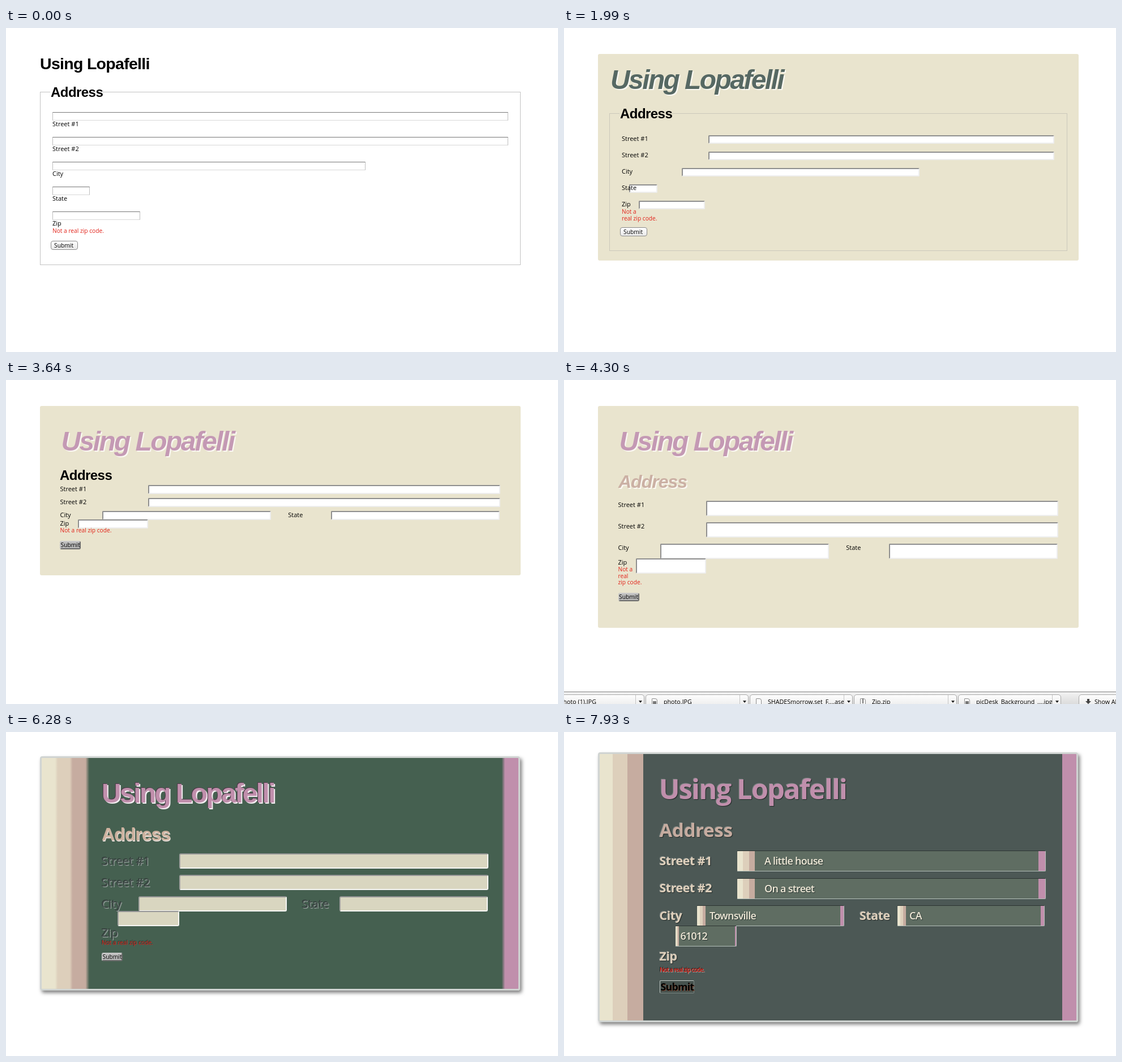
Animation of 975x574 px, one loop 8 s. Source, as an HTML page:

```html
<!DOCTYPE html>
<html lang="en">
<head>
<meta charset="utf-8">
<title>Styling a form</title>
<style>
  html, body { margin: 0; width: 100%; height: 100%; overflow: hidden; background: #fff; }
  .scene { position: absolute; inset: 0; overflow: hidden; display: none; }
  .scene div { position: absolute; box-sizing: border-box; }
  .text { line-height: 0; white-space: pre; color: #000; }
</style>
</head>
<body>
<script>
const LOOP = 8000;
const NAME = 'Using Lopafelli';
const cream = '#e9e4ce', tan = '#ddcfbb', rose = '#c6aca0', pink = '#c08fac', dark = '#4c5855', green = '#456050';

// family, ascent, descent
const FONT = {
  head: ['"Liberation Sans", Arial, sans-serif', .905, .212],
  body: ['"Open Sans", "Noto Sans", sans-serif', 1.069, .293]
};

// ---- drawing helpers ----
function box(parent, [x, y, w, h], css) {
  const el = document.createElement('div');
  el.style.cssText = `left:${x}px;top:${y}px;width:${w}px;height:${h}px;${css}`;
  parent.append(el);
  return el;
}

// y is the baseline
function text(parent, str, x, y, size, css = '', font = 'body') {
  const [family, up, down] = FONT[font];
  const shift = (Math.round(up * size) - Math.round(down * size)) / 2;
  const el = document.createElement('div');
  el.className = 'text';
  el.style.cssText = `left:${x}px;top:${y - shift}px;font:${size}px/0 ${family};${css}`;
  el.textContent = str;
  parent.append(el);
}

const bands = (mid, a, b, c, d) =>
  `linear-gradient(90deg,${cream} ${a}%,${tan} ${a}% ${b}%,${rose} ${b}% ${c}%,${mid} ${c}% ${d}%,${pink} ${d}%)`;

// ---- form layouts: fields as boxes, labels as [text, x, baseline] ----
const NAMES = ['Street #1', 'Street #2', 'City', 'State', 'Zip'];

function stacked(dy) {
  const row = i => 149 + 44 * i + dy;
  return {
    fields: [805, 805, 553, 66, 155].map((w, i) => [82, row(i), w, 15]),
    labels: NAMES.map((n, i) => [n, 82, row(i) + 25])
  };
}

function inline(x, dy, k) {
  const row = i => 178 + 29 * i + dy;
  const cols = [[158, 630], [158, 630], [109, 433], [13, 52], [31, 121]];
  return {
    fields: cols.map(([a, w], i) => [Math.round(x + a * k), row(i), Math.round(w * k), 15]),
    labels: NAMES.map((n, i) => [n, x, row(i) + 10.5])
  };
}

function grid(x, right, y, step, h, drop = 11, zipDrop = drop) {
  const w = right - x, y3 = y + 2 * step;
  const f = (a, top, b) => [Math.round(x + a * w), Math.round(top), Math.round(b * w), h + 1];
  return {
    fields: [f(.2, y, .8), f(.2, y + step, .8), f(.0957, y3, .383), f(.615, y3, .383), f(.0405, y3 + h, .16)],
    labels: [
      [NAMES[0], x, y + drop], [NAMES[1], x, y + step + drop], [NAMES[2], x, y3 + drop],
      [NAMES[3], x + .518 * w, y3 + drop], [NAMES[4], x, y3 + h + zipDrop]
    ]
  };
}

// ---- styles ----
const PLAIN = 'background:#fff;border:1px solid;border-color:#777 #bdbdbd #d8d8d8 #bdbdbd';
const INSET = 'background:#fff;border:2px solid;border-color:#8f8f8f #eee #eee #8f8f8f;border-radius:2px';
const TINT = 'background:rgba(233,228,205,.9);border:2px solid;border-color:#969696 #f6f6f4 #f6f6f4 #a2a2a0;border-radius:3px';
const STRIPED = `background:${bands('#5f6d62', 1.8, 3.8, 5.75, 97.8)};border:1px solid;border-color:#2c3432 #b4c0ba #b4c0ba #4a5552;border-radius:2px`;

const KEY = { css: 'background:linear-gradient(#fff,#f4f4f4 50%,#e9e9e9);border:1px solid #8a8a8a;border-radius:4px', pad: 6, base: 12, size: 10.3, text: 'font-weight:500' };
const GREY = { css: 'background:#bababa;border:2px solid;border-color:#cacaca #6a6a6a #6a6a6a #c4c4c4;border-radius:3px', pad: 1.5, base: 11.3, size: 10.3, text: 'font-weight:500' };
const BIG = { css: 'background:#46524e;border:1px solid;border-color:#c2cac6 #7c8783 #7c8783 #c2cac6;border-radius:2px', pad: 1.5, base: 18, size: 17.8,
  text: 'font-weight:700;letter-spacing:-.75px;text-shadow:1px 1px 0 #7a4a36' };

const bold = 'font-weight:700;';
const slant = bold + 'font-style:italic;';
const glow = 'text-shadow:2px 2px 0 #faf8f2;';
const emboss = `color:${dark};text-shadow:-1px -1px 0 #303937,1px 1px 0 #9ca7a2;`;
const raised = 'text-shadow:-1px -1px 0 rgba(255,255,255,.25),1px 1px 1px #232a28;';
const big = (x, y, css) => [x, y, 48, css + 'letter-spacing:-2.6px;', 'head'];
const sub = (x, y, css) => [x, y, 32, css + 'letter-spacing:-1px;', 'head'];
const legend = (x, y) => [x, y, 24, bold + 'letter-spacing:-.55px;', 'head'];

const panel = (bottom, fill = cream) => ({ at: [60, 46, 849, bottom - 46], css: `background:${fill};border-radius:3px` });
const framed = (top, bottom, fill) => ({
  at: [60, top, 848, bottom - top],
  css: `background:${fill};border:3px solid #d0d4d2;border-radius:4px;box-shadow:3px 4px 6px rgba(0,0,0,.5)`
});

const ERR = 'Not a real zip code.';
const TWO = ['Not a', 'real zip code.'];
const THREE = ['Not a', 'real', 'zip code.'];
const err = (x, y, lines = [ERR], css = '') => ({ x, y, lines, css });

const even = `linear-gradient(90deg,${cream},${tan},${rose},${pink},${green})`;
const edge = `linear-gradient(90deg,${cream} 2%,${tan} 2.6%,${rose} 3.1%,${pink} 4.3%,${green})`;
const soft = `linear-gradient(90deg,${cream} 2.8%,${tan} 3.4% 5.9%,${rose} 6.5% 9.2%,${green} 10% 96.5%,${pink} 97.2%)`;
const strips = mid => bands(mid, 2.75, 5.85, 9.15, 97);

const FILES = ['photo (2).JPG', 'photo (1).JPG', 'photo.JPG', 'SHADESmorrow.set_F....ase', 'Zip.zip', 'picDesk_Background_....jpg'];
const VALUES = [['A little house', 354, 235], ['On a street', 354, 283.5], ['Townsville', 257, 332], ['CA', 610, 332], ['61012', 205.5, 368]];

const carved = {
  title: big(169, 125.5, bold + emboss),
  addr: sub(169, 191.5, bold + emboss)
};

// each step changes only what it names
const STEPS = [
  [0, {
    bg: '#fff', title: [60, 73, 28.5, bold + 'letter-spacing:-.7px;', 'head'], addr: legend(79, 122),
    frame: { at: [60, 113, 849, 307], css: 'border:1px solid #c2c2c2', gap: '#fff' },
    form: stacked(0), field: PLAIN, label: [11, 'font-weight:500'], err: err(82, 363), button: KEY, btn: [79, 377, 48, 16]
  }],
  [1000, {
    title: big(62.5, 90, slant), addr: legend(79, 142), form: stacked(20), err: err(82, 383.5), btn: [79, 397, 48, 16],
    frame: { at: [60, 133, 849, 307], css: 'border:1px solid #c2c2c2', gap: '#fff' }
  }],
  [1330, {
    bg: '#eae6d0', title: big(62.5, 90, slant + 'color:#566863;'),
    frame: { at: [60, 133, 849, 307], css: 'background:#ddd0bc;border:1px solid #cbc8bb' }
  }],
  [1660, {
    title: big(62.5, 90, slant + glow + 'color:#566863;'), form: inline(82, -6, 1.02), field: INSET,
    frame: { at: [60, 133, 849, 245], css: 'background:#ddd0bc;border:1px solid #cbc8bb' },
    err: err(82, 311, TWO), btn: [79, 335, 48, 16]
  }],
  [1990, {
    bg: '#fff', panel: panel(412), title: big(82, 108, slant + glow + 'color:#566863;'), addr: legend(99, 160),
    frame: { at: [80, 151, 809, 244], css: 'border:1px solid #cbc8bb', gap: cream },
    form: inline(102, 12, .97), err: err(102, 329, TWO), btn: [99, 353, 48, 16]
  }],
  [2320, { title: big(82, 108, slant + glow + 'color:#c499b4;'), button: GREY, btn: [99, 354, 37, 15] }],
  [2650, {
    panel: panel(393), frame: null, title: big(89.5, 116, slant + glow + 'color:#c499b4;'), addr: legend(87, 168.5),
    form: inline(90, 0, 1), err: err(90, 317, TWO), btn: [87, 343, 37, 15]
  }],
  [2980, { panel: panel(342), form: grid(90, 878, 178, 29, 15), err: err(90, 274), btn: [87, 289, 37, 15] }],
  [3310, { panel: panel(329), form: grid(90, 878, 178, 23, 15), err: err(90, 261), btn: [87, 276, 37, 15] }],
  [3640, {
    panel: panel(346), title: big(97.5, 125, slant + glow + 'color:#c499b4;'), addr: legend(95, 177.5),
    form: grid(95.5, 873, 186, 23, 15), err: err(95.5, 270), btn: [95, 285, 37, 15]
  }],
  [3970, {
    panel: panel(392), addr: sub(96, 190.5, slant + glow + 'color:#cbb0a4;'),
    form: grid(95.5, 873, 214, 29, 15), err: err(95.5, 311), btn: [95, 328, 37, 15]
  }],
  [4300, {
    panel: panel(439), form: grid(95.5, 873, 214, 38, 26), err: err(95.5, 339.3, THREE), btn: [95.5, 376.5, 37, 15],
    bar: FILES.slice(1)
  }],
  [4630, { panel: panel(439, even), bar: FILES.slice(0, 5) }],
  [4960, {
    title: big(166, 125, bold + `color:${pink};text-shadow:-1px -1px 0 #4d3b49,2px 2px 0 #f4eef2;`),
    addr: sub(166, 191, bold + 'color:#cdb29f;text-shadow:1px 2px 0 #e6dcd6;'),
    form: grid(166, 874, 214, 38, 26), err: err(166, 339.3, THREE), btn: [166, 376, 37, 15]
  }],
  [5290, { panel: panel(439, edge), field: TINT }],
  [5620, { panel: panel(439, soft), bar: null }],
  [5950, {
    panel: framed(43, 444, soft), form: grid(169, 852, 215, 38, 26), err: err(169, 340.3, THREE), btn: [169, 377, 37, 15],
    title: big(169, 125.5, bold + `color:${pink};text-shadow:-1px -1px 0 #4d3b49,2px 2px 0 #f4eef2;`),
    addr: sub(169, 191.5, bold + 'color:#cdb29f;text-shadow:1px 2px 0 #e6dcd6;')
  }],
  [6280, {
    panel: framed(43, 458, soft), form: grid(169, 852, 215, 38, 26, 21, 46), label: [20.5, emboss + 'letter-spacing:-.15px'],
    err: err(169, 377, [ERR], 'text-shadow:-1px -1px 1px #262e2c'), btn: [169, 391, 37, 15]
  }],
  [6610, { panel: framed(43, 458, strips(green)) }],
  [6940, { panel: framed(43, 458, strips(dark)), ...carved }],
  [7270, {
    title: [168, 125.5, 48.5, bold + raised + `color:${pink};letter-spacing:-1.7px`, 'body'],
    addr: [168.5, 191.5, 33, bold + raised + `color:${rose};letter-spacing:-.25px`, 'body'],
    label: [21.5, bold + raised + `color:${tan};letter-spacing:-.5px`]
  }],
  [7600, {
    panel: framed(36, 509, strips(dark)),
    title: [168, 119, 48.5, bold + raised + `color:${pink};letter-spacing:-1.7px`, 'body'],
    addr: [168.5, 186, 33, bold + raised + `color:${rose};letter-spacing:-.25px`, 'body'],
    form: grid(168.5, 851, 210, 48.6, 36, 26, 62), field: STRIPED, values: VALUES,
    err: err(169, 425, [ERR], 'font-weight:600;letter-spacing:-.75px;text-shadow:-1px -1px 0 #262e2c,1px 1px 0 #98a29e'),
    btn: [169, 440, 37, 15]
  }],
  [7930, { panel: framed(36, 514, strips(dark)), button: BIG, btn: [169, 439.5, 61, 23] }]
];

function drawBar(s, files) {
  box(s, [0, 552, 975, 22], 'background:linear-gradient(#f2f2f2,#dcdcdc);border-top:1px solid #7f7f7f');
  const tab = (x, w) => box(s, [x, 557, w, 30], 'background:linear-gradient(#fdfdfd,#e6e6e6);border:1px solid #a9a9a9;border-radius:5px');
  files.forEach((name, i) => {
    const x = -40 + 184 * i;
    tab(x, 182);
    box(s, [x + 11, 564, 10, 14], 'background:#fafafa;border:1px solid #8d8d8d;border-radius:1px 4px 1px 1px');
    if (/jpg$/i.test(name)) box(s, [x + 13, 569, 6, 6], 'background:#777');
    if (/zip$/.test(name)) box(s, [x + 15, 564, 2, 9], 'background:#777');
    text(s, name, x + 32, 574, 10.7, 'font-weight:500');
    box(s, [x + 166, 558, 1, 16], 'background:#c4c4c4');
    box(s, [x + 172, 568, 6, 4], 'background:#222;clip-path:polygon(0 0,100% 0,50% 100%)');
  });
  tab(909, 90);
  box(s, [921, 565, 10, 9], 'background:#444;clip-path:polygon(30% 0,70% 0,70% 45%,100% 45%,50% 100%,0 45%,30% 45%)');
  text(s, 'Show All', 937, 574, 10.7, 'font-weight:500');
}

function build(st) {
  const s = document.createElement('div');
  s.className = 'scene';
  s.style.background = st.bg;
  if (st.panel) box(s, st.panel.at, st.panel.css);
  if (st.frame) {
    const { at, css, gap } = st.frame;
    box(s, at, css);
    if (gap) box(s, [at[0] + 18, at[1], 93, 1], `background:${gap}`);
  }
  text(s, NAME, ...st.title);
  text(s, 'Address', ...st.addr);
  st.form.fields.forEach(f => box(s, f, st.field));
  st.form.labels.forEach(([n, x, y]) => text(s, n, x, y, ...st.label));
  (st.values || []).forEach(([v, x, y]) =>
    text(s, v, x, y, 18, 'font-weight:600;color:#f0ead8;letter-spacing:-.75px;text-shadow:1px 1px 1px #2c3432'));
  st.err.lines.forEach((l, i) => text(s, l, st.err.x, st.err.y + 11.5 * i, 10.2, 'color:#e2231a;' + st.err.css));
  const [bx, by] = st.btn, b = st.button;
  box(s, st.btn, b.css);
  text(s, 'Submit', bx + b.pad, by + b.base, b.size, b.text);
  if (st.bar) drawBar(s, st.bar);
  document.body.append(s);
  return s;
}

let state = {};
const scenes = STEPS.map(([, patch]) => build(state = { ...state, ...patch }));

const start = performance.now();
let shown = -1;
function tick() {
  const t = (performance.now() - start) % LOOP;
  const now = STEPS.findLastIndex(([at]) => at <= t);
  if (now !== shown) {
    if (shown >= 0) scenes[shown].style.display = 'none';
    scenes[now].style.display = 'block';
    shown = now;
  }
  requestAnimationFrame(tick);
}
tick();
</script>
</body>
</html>
```
